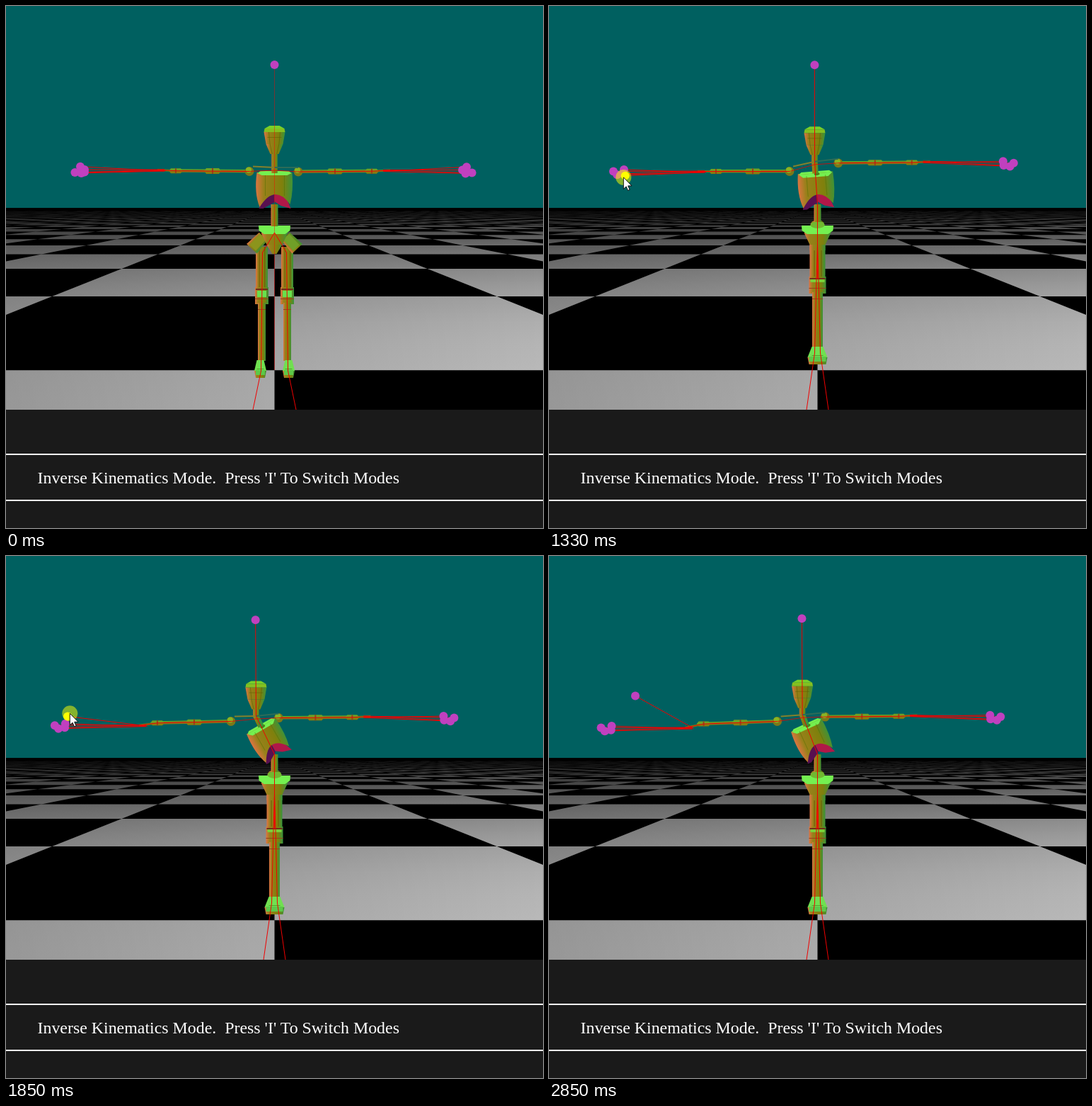
An HTML page with a canvas that plays this animation: 759x737 px, repeating every 3090 ms.

```html
<!DOCTYPE html>
<html lang="en">
<head>
<meta charset="utf-8">
<title>Inverse Kinematics</title>
<style>
html, body { margin: 0; width: 100%; height: 100%; overflow: hidden; background: #1a1a1a; }
canvas { position: absolute; left: 0; top: 0; display: block; }
p {
  position: absolute; left: 0; right: 0; top: 632px; height: 67px; margin: 0;
  box-sizing: border-box; border: solid #fff; border-width: 2px 0; padding-left: 44.5px;
  font: 23.9px/64px "Liberation Serif", Times, serif; color: #fff; white-space: pre; overflow: hidden;
}
</style>
</head>
<body>
<canvas id="floor" width="759" height="570"></canvas>
<p>Inverse Kinematics Mode.  Press 'I' To Switch Modes</p>
<canvas id="rig" width="759" height="737"></canvas>
<script>
const LOOP = 3090, GRAB = 1260, DROP = 2150, CX = 379.5, HORIZON = 285;
const floor = document.getElementById('floor').getContext('2d');
const c = document.getElementById('rig').getContext('2d');
const OLIVE = '#8a7c0e', LIME = '#74f050', RED = '#f00000', PINK = '#c040bf';

// time, x, y of the pointer
const mouse = [
  [100, 650, 708], [470, 95, 291], [630, 95, 291], [1050, 111, 233], [GRAB, 111, 233],
  [1460, 95, 258], [1620, 70, 257], [1820, 87, 225], [DROP, 122, 196],
  [2320, 250, 294], [2380, 368, 306], [2830, 695, 735]
];
// time, how far the body leans
const lean = [[GRAB, 0], [1460, .33], [1620, 1], [1780, .8], [DROP, .63]];

const clamp = (v, lo, hi) => Math.min(hi, Math.max(lo, v));

function sample(keys, t) {
  let i = 1;
  while (i < keys.length - 1 && t > keys[i][0]) i++;
  const a = keys[i - 1], b = keys[i];
  const k = clamp((t - a[0]) / (b[0] - a[0]), 0, 1);
  return a.slice(1).map((v, n) => v + (b[n + 1] - v) * k);
}

function trace(g, pts) {
  g.beginPath();
  for (let i = 0; i < pts.length; i += 2) g.lineTo(pts[i], pts[i + 1]);
}
function poly(fill, ...pts) { trace(c, pts); c.fillStyle = fill; c.fill(); }
function line(color, width, ...pts) {
  trace(c, pts);
  c.strokeStyle = color;
  c.lineWidth = width;
  c.stroke();
}
function dot(x, y, r, fill, ry = r) {
  c.beginPath();
  c.ellipse(x, y, r, ry, 0, 0, 7);
  c.fillStyle = fill;
  c.fill();
}
// surface colour follows its facing: orange left, olive front, green right
function skin(x, w) {
  const g = c.createLinearGradient(x - w, 0, x + w, 0);
  g.addColorStop(0, '#e07444');
  g.addColorStop(.22, '#98801a');
  g.addColorStop(.7, '#80800c');
  g.addColorStop(1, '#38943c');
  return g;
}
// trapezoid around x with half widths at top and bottom
function taper(x, top, w0, bottom, w1, fill = skin(x, Math.max(w0, w1))) {
  poly(fill, x - w0, top, x + w0, top, x + w1, bottom, x - w1, bottom);
}
const band = (x, w, y, h = 1, fill = '#98401a') => taper(x, y, w, y + h, w, fill);

function at(x, y, angle, paint) {
  c.save();
  c.translate(x, y);
  c.rotate(angle);
  paint();
  c.restore();
}

function drawFloor() {
  const g = floor;
  g.fillStyle = '#006060';
  g.fillRect(0, 0, 759, HORIZON);
  g.fillStyle = '#000';
  g.fillRect(0, HORIZON, 759, HORIZON);
  const light = g.createLinearGradient(0, HORIZON, 0, 570);
  for (let p = 0; p <= 1; p += 1 / 16) {
    const v = Math.round(192 * (1 - Math.exp(-4 * p - .1)));
    light.addColorStop(p, `rgb(${v},${v},${v})`);
  }
  g.fillStyle = light;
  const edge = row => row < 0 ? 285 : 275 / (row + 1.2);
  for (let row = -1; row < 60; row++) {
    const near = edge(row), far = edge(row + 1);
    const n = Math.ceil(CX / (2.515 * far)) + 1;
    for (let col = -n; col < n; col++) {
      if ((col + row) % 2) continue;
      const x = (k, d) => CX + 2.515 * k * d;
      trace(g, [x(col, near), HORIZON + near, x(col + 1, near), HORIZON + near,
        x(col + 1, far), HORIZON + far, x(col, far), HORIZON + far]);
      g.fill();
    }
  }
  const dim = g.createLinearGradient(0, 0, 759, 0);
  dim.addColorStop(0, 'rgba(0,0,0,.2)');
  dim.addColorStop(1, 'rgba(0,0,0,0)');
  g.fillStyle = dim;
  g.fillRect(0, HORIZON, 759, HORIZON);
}

function leg(x, thigh, top, knee, ankle, shin) {
  taper(x, top, thigh, knee, thigh);
  for (const s of [-.4, .5]) band(x + s * thigh, .5, top, knee - top, '#6a5a0a');
  taper(x, knee, thigh + 1, knee + 24, thigh + 1);
  band(x, thigh, knee + 2, 2, '#70301a');
  band(x, thigh + 1, knee + 16);
  taper(x, knee + 22, shin, ankle, shin);
  band(x, shin, knee + 31);
}

function foot(x, y, w0, w1) {
  taper(x, y, w0, y + 15, w1, '#70e050');
  taper(x, y + 15, w1, y + 25, w1 - 2, skin(x, w1));
  band(x, w1 - 2, y + 14, 7, '#5cc848');
  band(x, w0, y + 12, 1, '#50a030');
}

function lowerBody(posed) {
  if (posed) {
    leg(CX, 11, 330, 382, 483, 7.5);
    foot(CX, 481, 8, 14);
    band(CX, 10, 386, 4, '#78d038');
  } else {
    for (const s of [-1, 1]) {
      const x = CX + s * 18;
      leg(x, 8.5, 340, 397, 501, 5.5);
      band(x, 6.5, 402, 9, '#68e04c');
      foot(x + s * 2, 500, 5, 8.5);
      at(CX + s * 24, 334, s * -.75, () => {
        taper(0, -12, 8, 12, 10);
        band(0, 6, -11, 21, s < 0 ? '#8c941c' : '#70a028');
      });
    }
  }
  taper(CX, 320, 19, 337, 11);
  if (posed) taper(CX, 337, 11, 345, 11);
  else taper(CX, 337, 11, 350, 3);
  if (posed) dot(CX, 309, 10, skin(CX, 12), 7);
  taper(CX, 310, 22.5, 317, 22, LIME);
  taper(CX, 317, 22, 322, 15, LIME);
  if (posed) dot(CX, 309, 10, '#70b830', 5);
  taper(CX, 280, 5, posed ? 305 : 311, 5);
}

function arm(x, y, dir, drop) {
  const p = (d, k) => [x + dir * d, y + drop * k];
  const elbow = p(52, .2), wrist = p(104, .4), tip = p(130, 1);
  line('#84781c', 4, x, y, ...elbow, ...wrist);
  line('#60a828', 1, x, y - 2, elbow[0], elbow[1] - 2, wrist[0], wrist[1] - 2);
  line('#6c8418', 3, ...wrist, ...tip);
  for (const [[jx, jy], w, h] of [[elbow, 12, 4], [wrist, 10, 3.5]]) {
    taper(jx, jy - h, w - 3, jy, w, '#70a024');
    taper(jx, jy, w, jy + h, w - 3, OLIVE);
    band(jx, 1, jy - h, 2 * h);
  }
  dot(x, y, 6.5, '#7c7818');
  dot(x - 1, y - 2, 4, '#88b424');
  line(RED, 1, x, y, ...elbow, ...wrist, ...tip);
  return tip;
}

function torso(x, y, angle, posed) {
  at(x, y, angle, () => {
    c.scale(1 + angle * .14, 1);
    // hollow underside, then the front shell
    poly('#581050', -22, 26, -14, 4, 0, 4, 0, 17, -16, 26);
    poly('#b01848', 0, 4, 14, 4, 23, 26, 9, 22, 0, 16);
    c.beginPath();
    c.moveTo(-25, -25);
    c.lineTo(25, -25);
    c.quadraticCurveTo(27, 2, 22, 20);
    c.quadraticCurveTo(0, -10, -21, 24);
    c.quadraticCurveTo(-29, 4, -25, -25);
    c.fillStyle = skin(0, 27);
    c.fill();
    taper(0, -27, 20, -24, 24, LIME);
    taper(0, -24, 24, posed ? -19 : -21, 18, LIME);
    if (posed) dot(2, -23, 4, '#4c8018', 2);
    for (const s of [-13, 14]) band(s, .5, -21, 29, 'rgba(80,110,0,.5)');
  });
}

function head(x, y) {
  at(x, y, 0, () => {
    taper(0, 10, 15, 27, 12);
    taper(0, 27, 12, 41, 6);
    taper(0, 1, 7, 5, 14, '#78d028');
    taper(0, 5, 14, 10, 15, '#84c020');
    for (const s of [-8, 8]) line('rgba(90,90,0,.5)', 1, s, 10, s * .8, 27, s * .4, 41);
    band(0, 10, 17, 1, 'rgba(90,90,0,.5)');
  });
}

// four fingertip handles on a small ellipse, mirrored by dir
function fingertips(x, y, dir, turn) {
  return [0, 1, 2, 3].map(i => {
    const a = turn + i * 1.22;
    return [x + dir * -8 * Math.cos(a), y + 5 * Math.sin(a)];
  });
}

function pointer(x, y) {
  at(x, y, 0, () => {
    trace(c, [0, 0, 0, 16.5, 3.8, 13, 6.3, 18.6, 8.8, 17.5, 6.4, 12, 11.7, 12]);
    c.closePath();
    c.fillStyle = '#fff';
    c.fill();
    c.strokeStyle = '#000';
    c.lineWidth = .9;
    c.stroke();
  });
}

function draw(t) {
  const posed = t >= GRAB, held = posed && t < DROP;
  const [k] = sample(lean, t);
  const [ux, uy] = sample(mouse, t);
  const [px, py] = sample(mouse, clamp(t - 30, GRAB, DROP));
  const sag = 10 * Math.pow(k, 1.6), angle = -.68 * k;
  const hx = CX - 34 * k, hy = 168 + sag + (posed ? 1 : 0);
  const top = [hx - k, 83 + sag * 1.1];
  const neck = [hx, hy + (posed ? 50.5 : 60)];
  const tx = CX - 9 * k, ty = 260 + 2 * k;
  const chest = [tx + 24 * Math.sin(angle), ty - 24 * Math.cos(angle)];
  const lx = 344 - 34 * k, ly = 233.5, rx = 413 - 36 * k, ry = posed ? 220.5 + 10.5 * k : 234;
  const drop = posed ? 9 * clamp((t - 1350) / (DROP - 1350), 0, 1) : -2;

  c.clearRect(0, 0, 759, 737);
  c.save();
  c.beginPath();
  c.rect(0, 0, 759, 570);
  c.clip();

  lowerBody(posed);
  const ltip = arm(lx, ly, -1, drop), rtip = arm(rx, ry, 1, -2);
  torso(tx, ty, angle, posed);
  line(skin(hx, 5), 8.5, hx, hy + 38, ...neck, ...chest);
  line('#2c6c58', 2, ...neck, rx, ry - 6);
  line('#84802c', 2, ...neck, lx + 5, ly - 7);
  head(hx, hy);

  // bones
  line(posed ? RED : 'rgba(255,0,0,.45)', 1, ...top, hx, hy + 40, ...neck, ...chest,
    CX, 280, CX, posed ? 385 : 514);
  line(RED, .8, lx, ly, hx, neck[1] + 4, rx, ry);
  for (const s of [-1, 1]) {
    const b = d => CX + s * d;
    if (posed) line(RED, 1, CX, 335, b(1.5), 385, b(4), 490, b(15.5), 570);
    else line(RED, 1, CX, 320, b(17), 348, b(19), 515, b(30.5), 570);
  }

  // hand handles and the lines that reach them
  const turn = posed ? 0 : .8;
  const hands = [[lx - 241, ly + drop, -1, ltip], [rx + 240, posed ? ry : 232, 1, rtip]];
  for (const [x, y, dir, tip] of hands) {
    // fingertips fan out from inside the wrist
    const tips = fingertips(x, y, -dir, Math.PI - Math.PI + turn);
    tips.forEach(([fx, fy], i) => line(RED, 1, tip[0] - dir * 10, tip[1] + (i % 2 ? 1.5 : -.5), fx, fy));
    if (dir < 0) line(RED, 1, tip[0] + 12, tip[1] + 1, px, py + 1.5);
    for (const [fx, fy] of tips) dot(fx, fy - 0, 6, PINK);
  }
  dot(...top, 6, PINK);
  if (held) dot(ux, uy, 11, 'rgba(255,255,0,.52)');
  dot(px, py + 1.5, 6, t > 980 && t < DROP ? '#ff0' : PINK);
  c.restore();

  if (t >= 100 && t < 2840) pointer(ux, uy);
}

drawFloor();
const start = performance.now();
function tick() {
  draw((performance.now() - start) % LOOP);
  requestAnimationFrame(tick);
}
tick();
</script>
</body>
</html>
```
